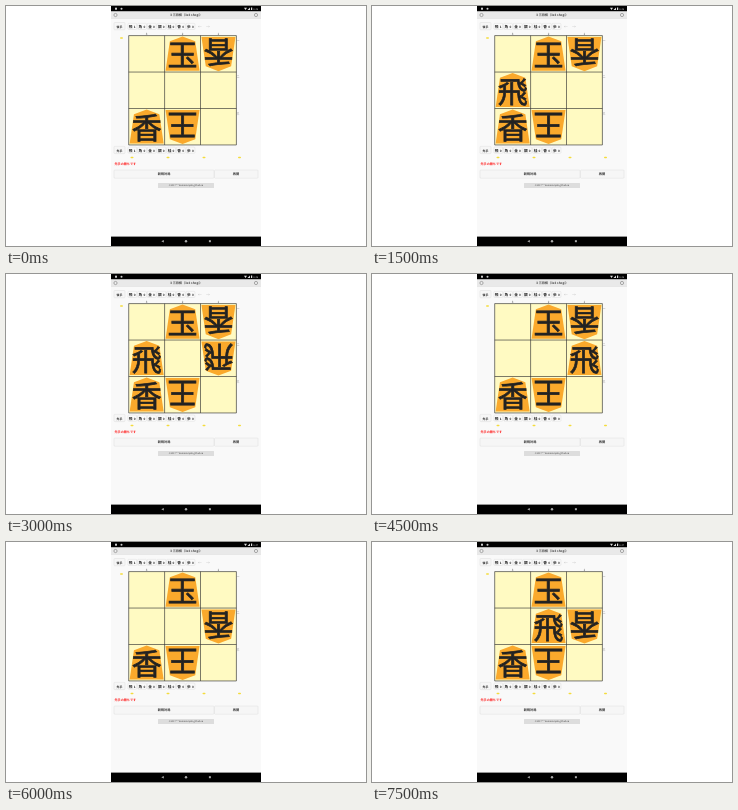
An HTML page for the animation above (8 s loop, 360 by 240 pixels).

```html
<!DOCTYPE html>
<html>
<head>
<meta charset="utf-8">
<style>
html, body { margin: 0; width: 100%; height: 100%; overflow: hidden; background: #fff; }
svg { display: block; width: 100vw; height: 100vh; }
text {
  font-family: "Noto Sans CJK JP", "Noto Sans CJK", sans-serif;
  text-anchor: middle;
  text-rendering: geometricPrecision;
}
</style>
</head>
<body>
<svg id="stage" viewBox="0 0 360 240"></svg>
<script>
const LOOP = 8000, STEP = 1500;
const BOARD = { x: 122.7, y: 29.6, w: 35.9, h: 36.45 };
const KINDS = [...'飛角金銀桂香歩'];

// Each piece: kind, column, row, and whether it faces down.
const kings = [['玉', 1, 0, false], ['王', 1, 2, true], ['香', 0, 2, false]];
const lanceHome = ['香', 2, 0, true], lanceMoved = ['香', 2, 1, true];
const positions = [
  { pieces: [lanceHome], rooks: [1, 1] },
  { pieces: [lanceHome, ['飛', 0, 1, false]], rooks: [1, 0] },
  { pieces: [lanceHome, ['飛', 0, 1, false], ['飛', 2, 1, true]], rooks: [0, 0] },
  { pieces: [lanceHome, ['飛', 2, 1, false]], rooks: [0, 1] },
  { pieces: [lanceMoved], rooks: [1, 1] },
  { pieces: [lanceMoved, ['飛', 1, 1, false]], rooks: [1, 0] },
];

const rect = (x, y, w, h, fill, extra = '') =>
  `<rect x="${x}" y="${y}" width="${w}" height="${h}" fill="${fill}" ${extra}/>`;
const text = (s, x, y, size, fill = '#333', weight = 400, extra = '') =>
  `<text x="${x}" y="${y}" font-size="${size}" fill="${fill}" font-weight="${weight}" ${extra}>${s}</text>`;
const path = (d, fill, extra = '') => `<path d="${d}" fill="${fill}" ${extra}/>`;
const circle = (x, y, r, fill, extra = '') =>
  `<circle cx="${x}" cy="${y}" r="${r}" fill="${fill}" ${extra}/>`;
const button = (x, y, w, h, fill = '#f6f6f6') =>
  rect(x, y, w, h, fill, 'rx="0.8" stroke="#ddd" stroke-width="0.5"');
const marker = (x, y) => rect(x - 1.5, y - 0.8, 3, 1.6, '#f4dc3c', 'rx="0.8"');

function statusBar(clock) {
  return rect(105, 0, 150, 5.5, '#000') +
    rect(109, 1.7, 2, 2, '#ccc') + circle(115.5, 2.7, 1, '#ccc') +
    path('M238 1.7h3l-1.5 2.3zM244 1.5v2.5h-2.5z', '#ddd') +
    rect(245, 1.5, 1.2, 2.5, '#ddd') + text(clock, 249.8, 3.7, 2.5, '#bbb');
}

function header() {
  const ring = x => circle(x, 9, 1.6, '#eee', 'stroke="#888" stroke-width="0.7"');
  return rect(105, 5.5, 150, 7.3, '#e9e9e9') +
    rect(105, 12.5, 150, 0.4, '#ddd') + ring(109.5) + ring(250) +
    text('３三将棋（3x3 shogi）', 180, 10.2, 3.1, '#444', 700);
}

function hand(label, y, rooks) {
  return button(108, y - 4, 11, 7.3) + text(label, 113.5, y + 1.2, 2.9, '#222', 700) +
    KINDS.map((kind, i) => {
      const x = 126.3 + i * 9.7;
      return button(x - 4.4, y - 3.2, 8.8, 6.2, '#fafafa') +
        text(kind, x - 1.6, y + 1.7, 3.7, '#222', 700) +
        text(i ? 0 : rooks, x + 2.3, y + 1.5, 3.1, '#222', 700);
    }).join('');
}

function board() {
  const { x, y, w, h } = BOARD;
  let lines = '';
  for (let i = 0; i < 4; i++) {
    lines += `M${x + i * w} ${y}v${3 * h}M${x} ${y + i * h}h${3 * w}`;
  }
  const labels = [...'一二三'].map((row, i) =>
    text(3 - i, x + (i + 0.5) * w, 28.6, 3, '#444') +
    text(row, 231.8, 35.7 + i * h, 3.2, '#777')).join('');
  return rect(x, y, 3 * w, 3 * h, '#fffac2') +
    path(lines, 'none', 'stroke="#333" stroke-width="0.65"') + labels;
}

function piece([kind, col, row, down]) {
  const cx = BOARD.x + (col + 0.5) * BOARD.w;
  const cy = BOARD.y + (row + 0.5) * BOARD.h;
  return `<g transform="translate(${cx} ${cy}) rotate(${down ? 180 : 0})">` +
    path('M0-17.3L12.7-12.5L17 16.8H-17L-12.7-12.5Z', '#faa92c') +
    text(kind, 0, 12.4, 30, '#222', 400, 'stroke="#222" stroke-width="0.7"') + '</g>';
}

function footer() {
  return [126, 162, 198, 233.5].map(x => marker(x, 151.5)).join('') +
    text('先手の勝ちです', 108.5, 158.8, 3.1, '#f22', 700, 'style="text-anchor:start"') +
    button(108, 164, 100, 8.2) + button(208.5, 164, 43.5, 8.2) +
    text('新規対局', 158, 169.3, 3.2, '#333', 700) +
    text('再開', 230, 169.3, 3.2, '#333', 700) +
    rect(152, 177, 56, 5, '#ddd', 'rx="0.6"') +
    text('©2017 ** komasample.github.io', 180, 179.8, 2.3, '#444');
}

function navigation() {
  return rect(105, 230.6, 150, 9.4, '#000') +
    path('M157.8 234v2.6l-2.5-1.3z', '#aaa') +
    circle(180, 235.2, 1.2, '#aaa') + rect(202.9, 234.2, 2, 2, '#aaa');
}

function scene(step) {
  const { pieces, rooks } = positions[step];
  return rect(105, 0, 150, 240, '#f9f9f9') + statusBar(step < 4 ? '8:46' : '8:47') +
    header() + hand('後手', 20.5, rooks[0]) +
    text('←', 194, 22, 3.8, '#bbb') + text('→', 202, 22, 3.8, '#bbb') +
    marker(115.5, 32) + board() + [...kings, ...pieces].map(piece).join('') +
    hand('先手', 144.3, rooks[1]) + footer() + navigation();
}

const stage = document.getElementById('stage');
let shown = -1;
function draw() {
  const step = Math.floor(performance.now() % LOOP / STEP);
  if (step !== shown) stage.innerHTML = scene(shown = step);
  requestAnimationFrame(draw);
}
draw();
</script>
</body>
</html>
```
